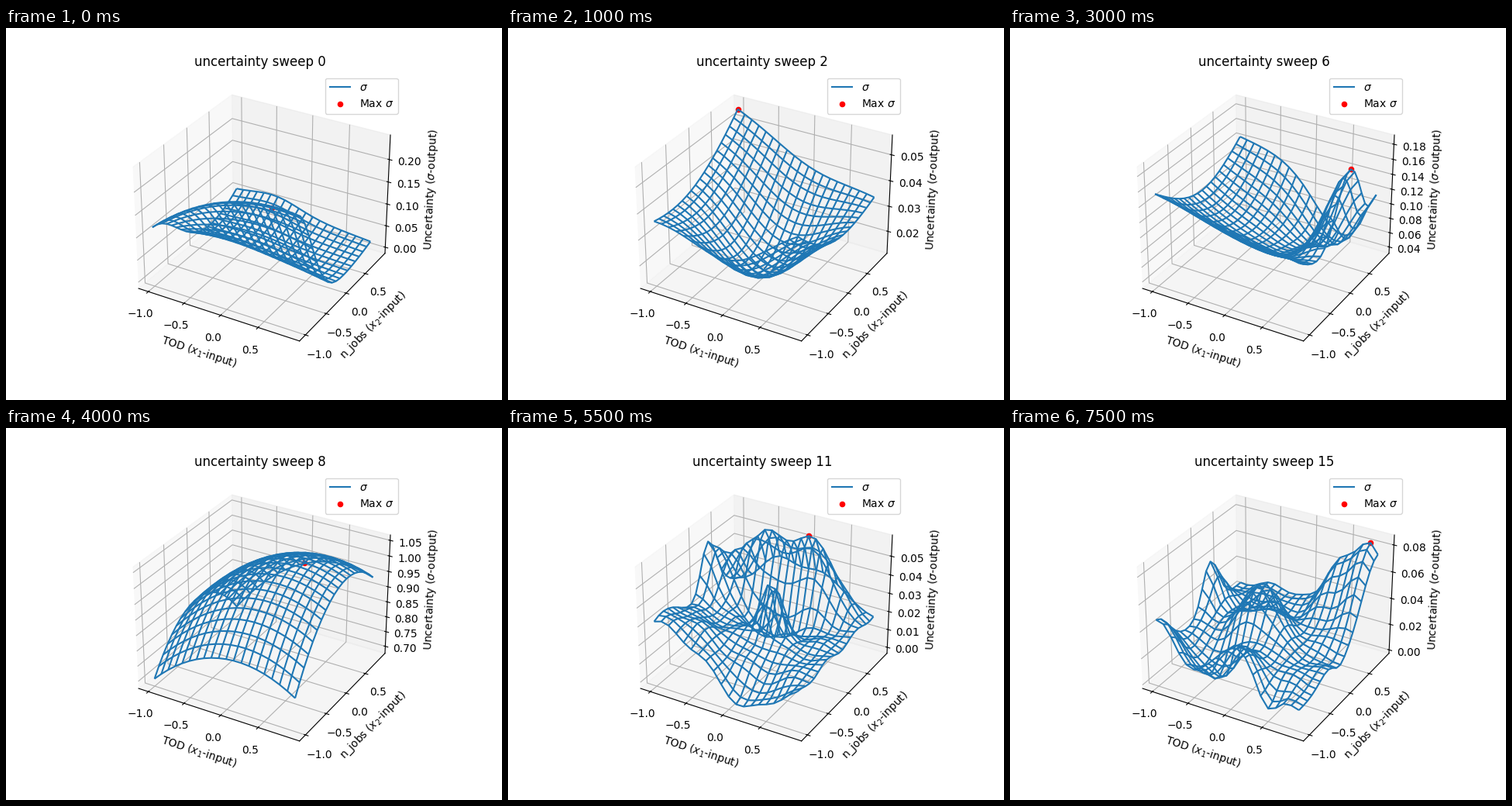
These frames come from a looping animation (640 px wide and 480 px high, 8000 ms). A matplotlib script:

```python
import numpy as np
import matplotlib.pyplot as plt
from matplotlib.animation import FuncAnimation

grid = np.arange(20) / 10 - 1
SPAN = grid[-1] - grid[0]
PAD = 0.0729 * SPAN       # gap between the data and the panes
INSET = 0.0636            # the same gap as a share of the pane height
LO, HI = grid[0] - PAD, grid[-1] + PAD

X, Y = np.meshgrid(grid, grid)
s, t = (X + 1) / SPAN, (Y + 1) / SPAN


def bump(amp, s0, t0, ws, wt):
    return amp * np.exp(-((s - s0) / ws) ** 2 - ((t - t0) / wt) ** 2)


def corners(a, b, c, d):
    """Bilinear sheet through the corners (0,0), (1,0), (0,1), (1,1)."""
    return (a * (1 - s) + b * s) * (1 - t) + (c * (1 - s) + d * s) * t


def ripple(amp, u, v):
    return amp * np.sin(u * s) * np.cos(v * t)


arch_s, arch_t = 4 * s * (1 - s), 4 * t * (1 - t)


def trough():
    front = 0.43 + 0.95 * s - 0.55 * s ** 2
    back = 0.18 - 0.1 * s + bump(0.08, 0.3, 1, 0.25, 1)
    return 0.1 + front * np.exp(-(t / (0.4 - 0.12 * s)) ** 2) + back * t ** 3


def early_waves():
    return (corners(0.5, 0.7, 0.6, 0.45) - 0.3 * arch_s * (1 - 0.5 * t)
            + bump(0.35, 0.5, 0.9, 0.3, 0.25) - bump(0.25, 0.6, 0.45, 0.3, 0.2))


def bowl():
    return (corners(0.54, 0.83, 0.95, 0.48) - 0.13 * arch_t
            - bump(0.62, 0.55, 0.38, 0.38, 0.5))


def twin_ridge():
    return (corners(0.6, 0.5, 0.6, 0.55) + bump(0.35, 0.3, 0.6, 0.25, 0.25)
            - bump(0.4, 0.6, 0.15, 0.25, 0.2) - bump(0.2, 0.8, 0.7, 0.2, 0.2))


def cliff():
    return (0.68 - 0.24 * t + bump(0.36, 0.63, 0.42, 0.25, 0.2)
            - bump(0.6, 0.4, 0, 0.2, 0.18) - bump(0.4, 0.85, 0, 0.25, 0.15)
            + bump(0.2, 0.4, 1, 0.2, 0.2) + bump(0.15, 0.8, 1, 0.12, 0.15)
            - bump(0.25, 1, 0.62, 0.15, 0.1))


def side_dip():
    return (corners(0.7, 0.6, 0.65, 0.5) - 0.2 * arch_t
            - bump(0.4, 0.3, 0.8, 0.3, 0.25) + bump(0.35, 0.9, 0.5, 0.2, 0.25)
            - bump(0.2, 0.5, 0.1, 0.25, 0.2))


def side_peak():
    return (0.76 - 0.23 * s - 0.07 * t - 0.25 * np.sin(np.pi * t)
            - 0.15 * arch_s * arch_t - bump(0.5, 0.78, 1, 0.3, 0.35)
            + bump(0.78, 1, 0.63, 0.2, 0.25) + bump(0.24, 1, 1, 0.1, 0.1))


def shallow_bowl():
    return (corners(0.65, 0.6, 0.75, 0.9) - 0.3 * arch_s - 0.25 * arch_t
            + bump(0.2, 0.55, 0.5, 0.2, 0.2))


def dome():
    a, b = s - 0.72, t - 0.6
    return 0.936 - 0.94 * a ** 2 - 1.39 * b ** 2 + 0.35 * a * b


def soft_hills():
    return (corners(0.55, 0.45, 0.6, 0.5) + bump(0.4, 0.6, 0.75, 0.25, 0.2)
            - bump(0.35, 0.4, 0.2, 0.25, 0.2) - bump(0.25, 0.9, 0.5, 0.15, 0.2))


def three_hills():
    return (corners(0.55, 0.35, 0.4, 0.4) + bump(0.45, 0.35, 0.8, 0.2, 0.18)
            + bump(0.35, 0.75, 0.6, 0.15, 0.16) - bump(0.3, 0.6, 0.05, 0.22, 0.2)
            + ripple(0.02, 18, 14))


def plateau():
    return (0.34 + bump(0.22, 0, 0.1, 0.35, 0.3) - bump(0.26, 0.64, 0, 0.24, 0.2)
            + bump(0.46, 0, 0.63, 0.12, 0.13) + bump(0.3, 0.15, 0.78, 0.13, 0.13)
            + bump(0.54, 0.64, 0.88, 0.2, 0.13) + bump(0.47, 0.32, 0.9, 0.18, 0.13)
            + bump(0.4, 0.55, 0.48, 0.1, 0.1) - bump(0.2, 0.45, 0.68, 0.25, 0.1)
            + ripple(0.025, 20, 17))


def broken_plateau():
    return (0.33 + bump(0.22, 0, 0, 0.25, 0.25) + bump(0.45, 0.05, 0.65, 0.12, 0.14)
            + bump(0.5, 0.7, 0.9, 0.18, 0.15) + bump(0.4, 0.45, 0.45, 0.14, 0.14)
            - bump(0.22, 0.7, 0.1, 0.2, 0.2) + ripple(0.03, 17, 19))


def scattered_peaks():
    return (0.32 + bump(0.22, 0, 0, 0.2, 0.25) + bump(0.4, 0.05, 0.7, 0.12, 0.14)
            + bump(0.45, 0.4, 0.6, 0.16, 0.15) + bump(0.4, 0.8, 0.95, 0.15, 0.16)
            - bump(0.2, 0.75, 0.15, 0.15, 0.2) + ripple(0.03, 22, 15))


def back_wall():
    return (0.3 + bump(0.25, 0, 0, 0.2, 0.22) + bump(0.4, 0.02, 0.65, 0.12, 0.14)
            + bump(0.35, 0.45, 0.5, 0.16, 0.16) + bump(0.55, 0.9, 1, 0.2, 0.22)
            - bump(0.18, 0.3, 0.2, 0.18, 0.16) + ripple(0.025, 19, 18))


def corner_peak():
    return (0.3 + bump(0.26, 0, 0, 0.15, 0.2) + bump(0.37, 0, 0.63, 0.1, 0.14)
            + bump(0.4, 0.45, 0.5, 0.18, 0.16) + bump(0.25, 0.55, 0.02, 0.15, 0.2)
            - bump(0.15, 0.78, 0, 0.1, 0.15) - bump(0.1, 1, 0, 0.1, 0.2)
            - bump(0.2, 0.3, 0.2, 0.2, 0.15) + bump(0.08, 0.3, 1, 0.3, 0.2)
            + bump(0.35, 0.72, 1, 0.12, 0.2) + bump(0.6, 0.95, 1, 0.15, 0.25)
            - bump(0.06, 1, 0.5, 0.2, 0.1) + ripple(0.02, 21, 16))


# (surface, lower and upper end of the z axis)
SWEEPS = [
    (trough, -0.0143, 0.2537),
    (early_waves, 0.0045, 0.0405),
    (bowl, 0.0111, 0.0575),
    (twin_ridge, 0.016, 0.105),
    (cliff, 0.0093, 0.0858),
    (side_dip, 0.03, 0.17),
    (side_peak, 0.0311, 0.1921),
    (shallow_bowl, 0.005, 0.043),
    (dome, 0.676, 1.067),
    (soft_hills, 0.0015, 0.0185),
    (three_hills, 0.0015, 0.0205),
    (plateau, -0.0034, 0.0612),
    (broken_plateau, -0.002, 0.075),
    (scattered_peaks, 0.004, 0.044),
    (back_wall, 0.001, 0.0195),
    (corner_peak, -0.0027, 0.0873),
]

fig = plt.figure(figsize=(6.4, 4.8), dpi=100)
ax = fig.add_subplot(projection="3d")


def inner(ticks, lo, hi):
    """Keep the ticks that stand clear of the pane edges."""
    edge = 0.02 * (hi - lo)
    return [v for v in ticks if lo + edge <= v <= hi - edge]


def draw(i):
    surface, lo, hi = SWEEPS[i]
    z = surface()
    z = (z - z.min()) / np.ptp(z)
    z = lo + (hi - lo) * (INSET + (1 - 2 * INSET) * z)
    top = np.unravel_index(z.argmax(), z.shape)

    ax.clear()
    ax.plot_wireframe(X, Y, z, label=r"$\sigma$")
    ax.scatter(X[top], Y[top], z[top], s=20, color="red", label=r"Max $\sigma$")
    ax.set(xlim=(LO, HI), ylim=(LO, HI), zlim=(lo, hi))
    ax.set_xticks(inner(np.arange(-1, 1.5, 0.5), LO, HI))
    ax.set_yticks(inner(np.arange(-1, 1.5, 0.5), LO, HI))
    ax.set_zticks(inner(ax.get_zticks(), lo, hi))
    ax.set_xlabel("TOD ($x_1$-input)")
    ax.set_ylabel("n_jobs ($x_2$-input)")
    ax.set_zlabel(r"Uncertainty ($\sigma$-output)")
    ax.set_title(f"uncertainty sweep {i}")
    ax.legend(loc="upper right")
    return []


anim = FuncAnimation(fig, draw, frames=len(SWEEPS), interval=500,
                     repeat=True, repeat_delay=0)
plt.show()
```
